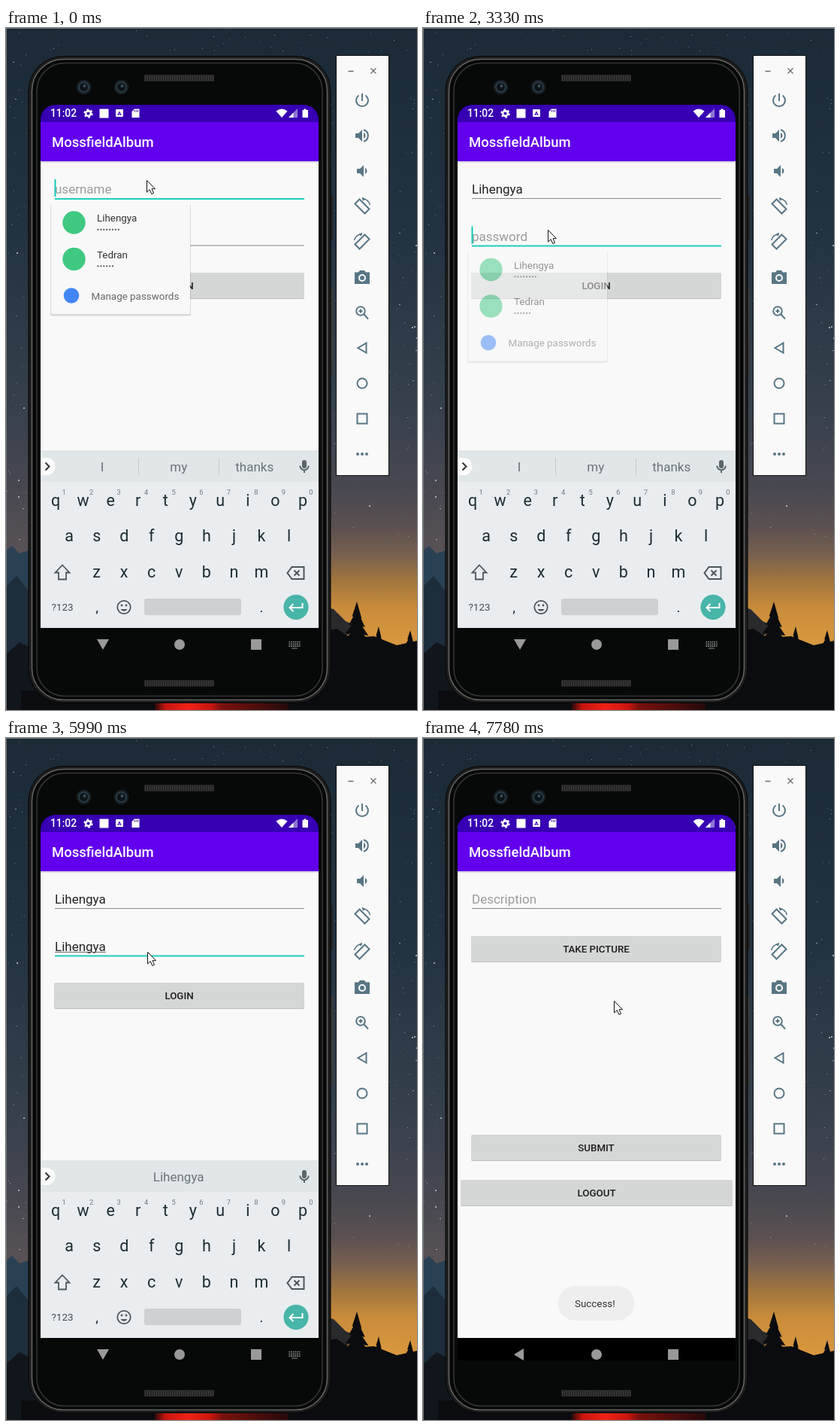
Recreate the animation shown at these times as an HTML page with a canvas. Size 547 by 906 pixels, loop 8 s.

```html
<!DOCTYPE html>
<html lang="en">
<head>
<meta charset="utf-8">
<title>Login demo</title>
<style>
html, body { margin: 0; width: 100%; height: 100%; overflow: hidden; background: #111; }
canvas, svg { position: absolute; left: 0; top: 0; display: block; }
text { font-family: Roboto, "Open Sans", sans-serif; white-space: pre; }
.mid { text-anchor: middle; }
.field { font-size: 17px; }
.hint { fill: #9b9b9b; }
.btn { font-size: 13.3px; font-weight: 500; text-anchor: middle; fill: #1c1c1c; }
.line { fill: none; stroke-width: 2; }
</style>
</head>
<body>
<canvas id="sky" width="547" height="906"></canvas>
<svg id="stage" width="547" height="906" viewBox="0 0 547 906"></svg>
<script>
const $ = id => document.getElementById(id);
const NAME = 'Lihengya', OTHER = 'Tedran', APP = 'MossfieldAlbum';
const LOOP = 8000;

// ---- night sky ----
function paintSky() {
  const c = $('sky').getContext('2d');
  let seed = 11;
  const rnd = () => (seed = (seed * 16807) % 2147483647) / 2147483647;
  const shape = (color, pts) => {
    c.fillStyle = color;
    c.beginPath();
    pts.forEach(p => c.lineTo(p[0], p[1]));
    c.fill();
  };
  const fade = (x, w, stops) => {
    const g = c.createLinearGradient(0, 0, 0, 906);
    stops.forEach(s => g.addColorStop(s[0], s[1]));
    c.fillStyle = g;
    c.fillRect(x, 0, w, 906);
  };
  const top = [[0, '#1b2a36'], [.3, '#223241'], [.55, '#36404c'], [.67, '#474750']];
  fade(0, 300, [...top, [.78, '#5a5356']]);
  fade(300, 247, [...top, [.73, '#5a5051'], [.77, '#765f50'], [.81, '#a0753e'],
    [.85, '#c98c3b'], [.9, '#d7973e']]);
  for (let i = 0; i < 1000; i++) {
    const x = rnd() * 547, y = rnd() * 680, s = rnd();
    c.fillStyle = `rgba(205,220,230,${.12 + s * s * .6})`;
    c.fillRect(x | 0, y | 0, s > .93 ? 2 : 1, s > .96 ? 2 : 1);
  }
  shape('#2a4154', [[0, 694], [8, 688], [18, 698], [30, 694], [60, 716], [60, 906], [0, 906]]);
  shape('#1d2d3b', [[0, 742], [14, 728], [32, 750], [60, 765], [60, 906], [0, 906]]);
  shape('#10161c', [[0, 832], [18, 816], [34, 824], [60, 906], [0, 906]]);
  shape('#2a2a2d', [[420, 768], [436, 772], [452, 788], [470, 796], [420, 830]]);
  const pine = (x, y, w, h) => {
    for (let i = 0; i < 7; i++) {
      const a = y + h * i / 8, b = y + h * (i + 2) / 8, r = w * (i + 1.4) / 8;
      shape('#0b0c0f', [[x, a], [x + r, b], [x - r, b - 3]]);
    }
  };
  pine(467, 762, 36, 90);
  pine(496, 795, 20, 60);
  pine(538, 800, 22, 60);
  shape('#0b0c0f', [[400, 806], [440, 798], [458, 810], [490, 808], [520, 820], [547, 814], [547, 906], [400, 906]]);
  c.fillRect(20, 880, 430, 26);
  const red = c.createLinearGradient(198, 0, 376, 0);
  [[0, '#2a0a0a'], [.08, '#c8160f'], [.25, '#ee2216'], [.42, '#c8160f'], [.5, '#7a120e'], [1, '#240a0a']]
    .forEach(s => red.addColorStop(s[0], s[1]));
  c.fillStyle = red;
  c.fillRect(198, 895, 178, 11);
  c.fillStyle = '#6d7276';
  c.fillRect(0, 0, 547, 1);
  c.fillRect(0, 0, 1, 906);
}

// ---- markup helpers ----
const rect = (x, y, w, h, fill, more = '') =>
  `<rect x="${x}" y="${y}" width="${w}" height="${h}" fill="${fill}" ${more}/>`;
const disc = (x, y, r, fill, more = '') =>
  `<circle cx="${x}" cy="${y}" r="${r}" fill="${fill}" ${more}/>`;
const path = (d, more) => `<path d="${d}" ${more}/>`;
const text = (x, y, s, more = '') => `<text x="${x}" y="${y}" ${more}>${s}</text>`;
const group = (id, body, more = '') => `<g id="${id}" ${more}>${body}</g>`;
const at = (x, y, body) => `<g transform="translate(${x} ${y})">${body}</g>`;
const button = (x, y, w, h, label) =>
  rect(x, y + 1, w, h, '#bfc1c0', 'rx="2"') + rect(x, y, w, h, '#d5d7d6', 'rx="2"') +
  text(x + w / 2, y + h / 2 + 4.8, label, 'class="btn"');
const field = (id, y, hint) =>
  text(65, y - 7, hint, `id="${id}Hint" class="field hint"`) +
  text(65, y - 7, '', `id="${id}" class="field" fill="#222"`) +
  rect(65, y - 1, 332, 1, '#8a8a8a', `id="${id}Line"`);
const chrome = () =>
  rect(46, 80, 370, 45, '#3700b3') + rect(46, 125, 370, 672, '#f9f9f9') +
  rect(46, 177, 370, 2, '#d9d9dc') + rect(46, 125, 370, 52, '#6200ee') +
  text(61, 158, APP, 'font-size="18.5" font-weight="500" fill="#fff"');

function phone() {
  const speaker = y => rect(184, y, 93, 9, '#262626', 'rx="1"') +
    path(`M185 ${y + 4.5}H276`, 'stroke="#3a3a3a" stroke-width="7" stroke-dasharray="1 2"');
  const lens = x => disc(x, 78.5, 10, '#161d21') +
    disc(x, 78.5, 6.5, '#0c1418', 'stroke="#2a3c46" stroke-width="2"') + disc(x + 1, 77, 2, '#3b4f5a');
  return rect(430, 222, 5, 60, '#242424', 'rx="2"') + rect(430, 343, 5, 118, '#3a3a3a', 'rx="2"') +
    rect(30, 37.5, 402, 859, '#1d1d1d', 'rx="46" stroke="#050505"') +
    rect(34.5, 41.5, 393, 851, '#060707', 'rx="42" stroke="#626262" stroke-width="1.6"') +
    rect(41, 46.5, 380, 841, '#070808', 'rx="37" stroke="#343434" stroke-width="1.6"') +
    speaker(62) + speaker(866) + lens(103.5) + lens(153.5);
}

function statusIcons() {
  return text(59, 118.3, '11:02', 'font-size="13.8" font-weight="500" fill="#fff"') +
    disc(109.5, 113.5, 3.4, 'none', 'stroke="#fff" stroke-width="2.6"') +
    disc(109.5, 113.5, 5.2, 'none', 'stroke="#fff" stroke-width="2" stroke-dasharray="2.6 2.84"') +
    rect(124.5, 107.5, 12, 12, '#fff') +
    rect(146, 108, 10, 10, '#fff', 'rx="1"') +
    text(151, 116, 'A', 'class="mid" font-size="8" font-weight="700" fill="#3700b3"') +
    path('M171 107.5h6.5v11.5h-10v-8z', 'fill="#fff"') +
    path('M171 109v2.5M173.3 109v2.5M175.5 109v2.5', 'stroke="#3700b3"') +
    path('M359.5 110.5Q367 104.5 374.5 110.5L367 119z', 'fill="#fff"') +
    path('M388 107v12h-12z', 'fill="#8f76d3"') + path('M382.5 112.5v6.5h-6.5z', 'fill="#fff"') +
    path('M394.5 109h2v-1.5h3v1.5h2.5v10h-7.5z', 'fill="#fff"');
}

function popup() {
  const row = (y, name, n) => disc(90.5, y, 15.2, '#3fc981') +
    text(121, y - 1.5, name, 'font-size="13.4" fill="#333"') +
    path(`M122.5 ${y + 9.3}h${(n - 1) * 3.9 + .1}`,
      'stroke="#555" stroke-width="2.3" stroke-linecap="round" stroke-dasharray="0 3.9"');
  return rect(59, 234, 0, 0, '#000', 'id="popShade" opacity=".13" rx="2"') +
    rect(60, 233, 0, 0, '#f8f8f8', 'id="popBox" rx="2"') + row(258.5, NAME, 8) +
    group('popMore', row(307, OTHER, 6) + disc(87, 355.5, 10.3, '#4285f4') +
      text(113.5, 360.5, 'Manage passwords', 'font-size="13.4" fill="#666"'));
}

function keyboard() {
  let keys = '';
  [['qwertyuiop', 66, 635], ['asdfghjkl', 84.2, 682], ['zxcvbnm', 120.6, 729.5]].forEach(([row, x, y], r) => {
    [...row].forEach((k, i) => {
      const cx = x + i * 36.55;
      keys += text(cx, y, k, 'class="mid key" font-size="21.5" fill="#1d2d33"');
      if (!r) keys += text(cx + 11, 619.5, (i + 1) % 10, 'class="mid" font-size="9.3" fill="#707a7e"');
    });
  });
  const ink = 'class="line" stroke="#4c575c"';
  return rect(46, 561, 370, 236, '#e9edf0') + rect(46, 561, 370, 42, '#e1e6e8') +
    path('M46 571H54a11 11 0 0 1 0 23H46z', 'fill="#fbfbfb"') +
    path('M52.5 577.5l5 5-5 5', 'class="line" stroke="#333"') +
    path('M176.5 571v23M283.5 571v23', 'id="bars" stroke="#c4cacd"') +
    [128, 229.7, 330.7].map((x, i) => text(x, 588.8, '', `id="word${i}" class="mid" font-size="17"`)).join('') +
    rect(394, 574, 6, 11, '#5b666b', 'rx="3"') +
    path('M391.3 581.5a5.7 5.7 0 0 0 11.4 0M397 587v4', 'class="line" stroke="#5b666b"') +
    keys +
    path('M75 713.5l9.5 10H80v9H70v-9h-4.5z', 'id="shift" stroke="#4c575c" stroke-width="1.8" fill="none"') +
    path('M380.5 716H396.5V732H380.5L374.5 724z', ink) + path('M383.5 720.5l7 7M390.5 720.5l-7 7', ink) +
    text(75, 774, '?123', 'class="mid" font-size="13.5" fill="#424e53"') +
    text(121, 776, ',', 'class="mid" font-size="19" fill="#1d2d33"') +
    text(340, 776, '.', 'class="mid" font-size="19" fill="#1d2d33"') +
    disc(157, 769.5, 8.7, 'none', 'stroke="#4c575c" stroke-width="1.8"') +
    disc(154, 767, 1.4, '#4c575c') + disc(160, 767, 1.4, '#4c575c') +
    path('M152.5 772a5 5 0 0 0 9 0z', 'fill="#4c575c"') +
    rect(184, 758, 129, 22, '#cdd1d3', 'rx="3"') +
    disc(386, 769.3, 16.6, '#47b5a8') +
    path('M394.5 764v6H378M382.5 765l-5 5 5 5', 'class="line" stroke="#fff"') +
    rect(46, 797, 370, 30, '#070808');
}

function toolPanel() {
  const ink = 'class="line" stroke="#587684"', fill = 'fill="#587684"';
  const horn = x => path(`M${x}-3h4l5-5V8l-5-5h-4z`, fill);
  const wave = x => path(`M${x}-4q2.5 1.2 2.5 4t-2.5 4z`, fill);
  const rotate = path('M-9.5-3.5L-3.5-9.5 9.5 3.5 3.5 9.5z', ink) +
    path('M0-10.5Q8.5-9.5 10.5-2', 'fill="none" stroke="#587684" stroke-width="1.5"') +
    path('M0-12.5L5-9.500 1-7.500z', fill);
  const items = [
    path('M0-9V1M-4.5-6.5a8 8 0 1 0 9 0', ink),
    horn(-9) + wave(2) + path('M2-7.7a8 8 0 0 1 0 15.4', ink),
    horn(-7) + wave(4),
    rotate,
    `<g transform="scale(-1 1)">${rotate}</g>`,
    path('M-10-6.5h5l2-2.5h6l2 2.5h5V9h-20z', fill) + disc(0, 1, 4, '#587684', 'stroke="#f9f9f9" stroke-width="2"'),
    disc(-2, -2, 5.8, 'none', ink) + path('M2.5 2.5L8 8.5M-4.5-2h5M-2-4.5v5', ink),
    path('M5.5-6.5v13L-5.5 0z', ink),
    disc(0, 0, 6.5, 'none', ink),
    rect(-6.5, -6.5, 13, 13, 'none', ink),
    [-6, 0, 6].map(x => disc(x, 0, 2, '#587684')).join('')
  ];
  return rect(439.5, 36.5, 70, 558, '#f9f9f9', 'stroke="#111"') +
    path('M455.5 57.5h7M485.5 53.5l7 7M492.5 53.5l-7 7', 'stroke="#6c6c6c" stroke-width="1.3"') +
    items.map((body, i) => at(474, 96 + i * 47, body)).join('');
}

function build() {
  const oldView = chrome() + field('user', 227, 'username') + field('pass', 289.5, 'password') +
    button(64, 325, 333, 34, 'LOGIN') +
    disc(240, 342, 0, '#000', 'id="ripple" opacity=".1" clip-path="url(#btnClip)"') +
    rect(65, 0, 0, 1, '#6a6a6a', 'id="under"') + rect(0, 0, 2, 23, '#12c9b8', 'id="caret"');
  const newView = chrome() + text(65, 220, 'Description', 'class="field hint"') +
    rect(65, 226, 332, 1, '#8a8a8a') + button(64, 263, 333, 34, 'TAKE PICTURE') +
    button(64, 527, 333, 34, 'SUBMIT') + button(50, 587, 362, 34, 'LOGOUT');
  const dots = [0, 1, 2].map(r => path(`M376.5 ${815.5 + r * 2.8}h15`,
    'stroke="#8d8d8d" stroke-width="1.7" stroke-dasharray="1.7 1"')).join('');
  $('stage').innerHTML =
    `<defs><clipPath id="screen">${path('M46 827V122a20 20 0 0 1 20-20H396a20 20 0 0 1 20 20V827z', '')}</clipPath>
     <clipPath id="btnClip">${rect(64, 325, 333, 34, '#000')}</clipPath>
     <clipPath id="reveal">${rect(46, 900, 370, 900, '#000', 'id="edge"')}</clipPath></defs>` +
    phone() +
    `<g clip-path="url(#screen)">` + rect(46, 102, 370, 725, '#000') +
    group('old', oldView) + rect(46, 102, 370, 695, '#000', 'id="dim" opacity="0"') +
    `<g clip-path="url(#reveal)">${group('new', newView)}</g>` +
    group('toast', rect(179.5, 728, 102, 46, '#eeeeee', 'rx="23"') +
      text(202, 756, 'Success!', 'font-size="13.4" fill="#333"')) +
    group('keys', keyboard()) + group('pop', popup()) + statusIcons() + '</g>' +
    path('M121 812h16l-8 14z', 'id="hide" fill="#999"') +
    path('M134 811v16l-13-8z', 'id="back" fill="#999"') +
    disc(231, 819, 7, '#999') + rect(326, 812, 14, 14, '#999') +
    group('dots', dots + path('M380 824h8', 'stroke="#8d8d8d"')) +
    toolPanel() +
    path('M0 0V15.5L3.7 12.2 6.3 18 9 16.8 6.5 11.2H11z', 'id="mouse" fill="#fff" stroke="#111"');
}

// ---- timeline: each step overrides only what changes ----
const IDLE = ['I', 'my', 'thanks'];
const typed = n => NAME.slice(0, n);
const words = n => [
  IDLE, ['L', 'Let', 'I'], ['Li', '*Lid', 'Hi'], ['Lih', '*Lib', 'Life'], ['Lihe', '*Like', 'Live'],
  ['Lihen', '*Linen', 'Listen'], ['Liheng', '*Lineup', 'Lifting'], ['Lihengy', '*Lifeguy', 'Lineup'], ['', NAME, '']
][n];
const user = (n, more) => ({ user: typed(n), words: words(n), caret: 1, ...more });
const pass = (n, more) => ({ pass: typed(n), words: words(n), caret: 1, ...more });
const mouse = (x, y, more) => ({ mouse: [x, y], ...more });
const move = (edge, newY, oldY, dim, keyY, keyA, toast) => ({ edge, newY, oldY, dim, keyY, keyA, toast });

const STEPS = [
  [0, { user: '', pass: '', focus: 'user', caret: 1, words: IDLE, upper: 0, pop: 'full', popY: 0, popA: 1,
    mouse: [187.5, 202.5], ripple: 0, nav: 0, ...move(900, 0, 0, 0, 0, 1, 0) }],
  [850, user(1, { upper: 1, pop: 'one' })],
  [990, user(2, { upper: 0 })],
  [1110, user(3)],
  [1390, user(4)],
  [1540, user(5)],
  [1660, user(6)],
  [1790, user(7)],
  [1930, user(8, { pop: '' })],
  [2360, mouse(187.5, 200.5, { caret: 0 })],
  [2510, mouse(180.5, 179.5)],
  [2630, mouse(177.5, 202.5)],
  [2780, mouse(170.5, 246.5)],
  [2900, mouse(166.5, 268.5, { caret: 1 })],
  [3170, { focus: 'pass', words: IDLE }],
  [3330, { pop: 'full', popY: 62.5, popA: .5 }],
  [3480, { popA: 1 }],
  [3630, { caret: 0 }],
  [4000, pass(1, { pop: '' })],
  [4150, pass(2)],
  [4270, pass(3)],
  [4420, pass(4)],
  [4540, pass(5)],
  [4690, pass(6)],
  [4940, pass(7)],
  [5060, pass(8)],
  [5590, mouse(164.5, 232.5, { caret: 0 })],
  [5990, mouse(188.5, 284.5)],
  [6140, mouse(215.5, 316.5, { caret: 1 })],
  [6260, mouse(234.5, 334.5)],
  [6410, mouse(239.5, 338.5)],
  [6640, { caret: 0, ripple: 40 }],
  [6800, { ripple: 110 }],
  [6960, { ripple: 200 }],
  [7120, mouse(249.5, 345.5, { nav: 1, ripple: 0, ...move(700, 29, 1, .02, 2, .97, 0) })],
  [7270, mouse(254.5, 349.5, move(470, 24, 3.5, .06, 6, .92, .3))],
  [7390, move(212, 17, 6.5, .1, 11, .84, .6)],
  [7510, move(102, 6, 11, .1, 18, .35, .8)],
  [7630, move(102, 1, 14, .1, 24, 0, .95)],
  [7780, move(102, 0, 14, .1, 24, 0, 1)]
];

let sum = {};
const STATES = STEPS.map(([time, change]) => ({ time, ...(sum = { ...sum, ...change }) }));

const set = (id, props) => { for (const k in props) $(id).setAttribute(k, props[k]); };
const shift = (id, y) => set(id, { transform: `translate(0 ${y})` });

function showField(id, value, y, focused) {
  $(id).textContent = value;
  set(id + 'Hint', { opacity: value ? 0 : 1 });
  set(id + 'Line', { height: focused ? 2 : 1, fill: focused ? '#1fcfbe' : '#8a8a8a' });
  if (!focused) return;
  const w = value ? $(id).getComputedTextLength() : 0;
  set('caret', { x: 64.5 + w, y: y - 26 });
  set('under', { width: w, y: Math.floor(y - 5) });
}

function show(s) {
  showField('user', s.user, 227, s.focus === 'user');
  showField('pass', s.pass, 289.5, s.focus === 'pass');
  set('caret', { opacity: s.caret });
  s.words.forEach((w, i) => {
    const bold = w[0] === '*';
    $('word' + i).textContent = bold ? w.slice(1) : w;
    set('word' + i, { 'font-weight': bold ? 700 : 400, fill: bold ? '#111' : '#6a7377' });
  });
  set('bars', { opacity: s.words[0] ? 1 : 0 });
  document.querySelectorAll('.key').forEach(k => {
    k.textContent = s.upper ? k.textContent.toUpperCase() : k.textContent.toLowerCase();
  });
  set('shift', { fill: s.upper ? '#4c575c' : 'none' });
  const full = s.pop === 'full', w = full ? 185 : 130, h = full ? 147 : 51;
  set('popBox', { width: w, height: h, fill: full ? '#f8f8f8' : '#ececec' });
  set('popShade', { width: w + 2, height: h + 1.5 });
  set('popMore', { opacity: full ? 1 : 0 });
  set('pop', { opacity: s.pop ? s.popA : 0 });
  shift('pop', s.popY);
  set('ripple', { r: s.ripple });
  set('mouse', { transform: `translate(${s.mouse})` });
  set('edge', { y: s.edge });
  shift('new', s.newY);
  shift('old', -s.oldY);
  set('dim', { opacity: s.dim });
  shift('keys', s.keyY);
  set('keys', { opacity: s.keyA });
  set('toast', { opacity: s.toast });
  set('hide', { opacity: 1 - s.nav });
  set('dots', { opacity: 1 - s.nav });
  set('back', { opacity: s.nav });
}

paintSky();
build();
const start = performance.now();
let shown;
function tick() {
  const t = (performance.now() - start) % LOOP;
  const state = STATES.filter(s => s.time <= t).pop();
  if (state !== shown) show(shown = state);
  requestAnimationFrame(tick);
}
tick();
</script>
</body>
</html>
```
